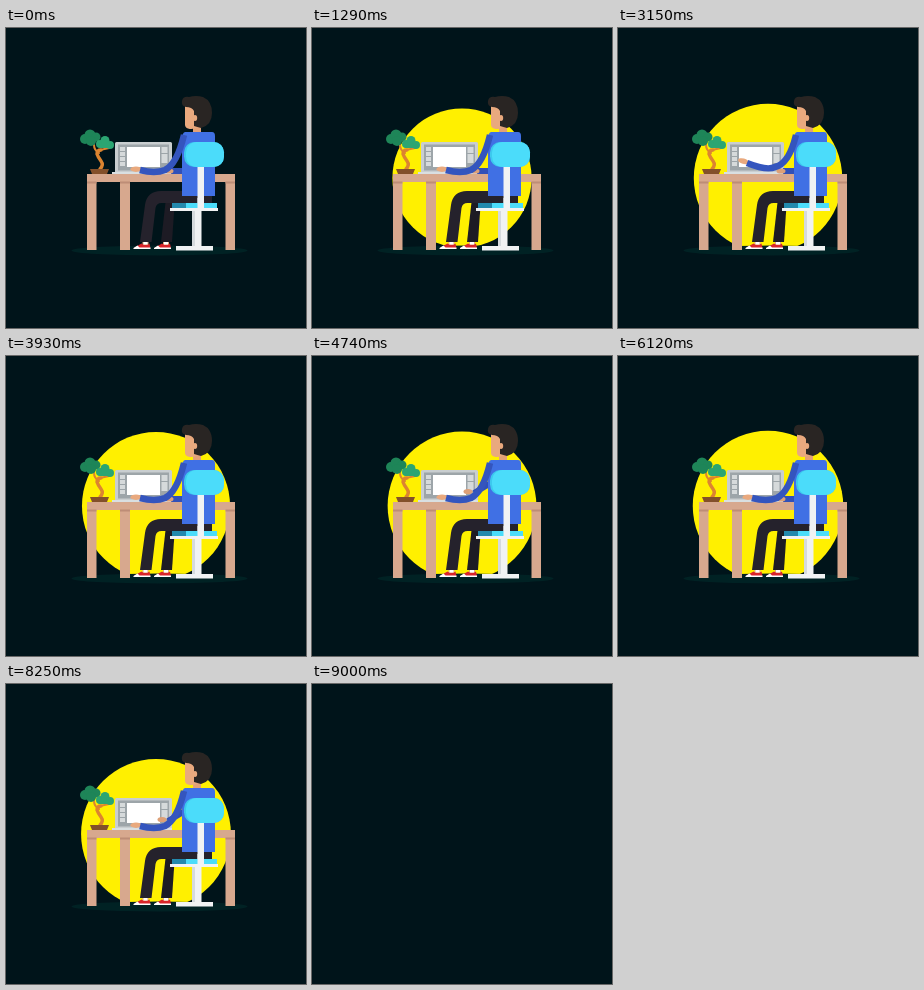
Animation, 300 px wide and 300 px high, one loop 9030 ms. Source, as an HTML page:

```html
<!DOCTYPE html>
<html lang="en">
<head>
<meta charset="utf-8">
<title>Desk work</title>
<style>
  html, body { margin: 0; width: 100%; height: 100%; overflow: hidden; background: #00141a; }
  svg { display: block; width: 100vw; height: 100vh; }
</style>
</head>
<body>
<svg viewBox="0 0 300 300">
  <defs>
    <g id="shoe">
      <path fill="#e3a882" d="M9 0h6v4H9z"/>
      <path fill="#d9252b" d="M1 6 8 2q4 3 8 0l1 5H0z"/>
      <path fill="#fff" d="M0 6.5 4 4l2 2h11v1.5H0zM10 0h4v3h-4z"/>
    </g>
  </defs>
  <g id="scene">
    <circle id="sun" cx="150" cy="150" fill="#fff000"/>
    <ellipse cx="153.5" cy="222.5" rx="88" ry="5" fill="#002224"/>

    <g id="plant">
      <g fill="none" stroke="#dc8430" stroke-linecap="round">
        <path stroke-width="3.4" d="M94 141q4-4 1-8t-4-7q0-4 4-4"/>
        <path stroke-width="2" d="M93 125q-5-3-5-8M94 122l9-2"/>
      </g>
      <g fill="#1e8558">
        <circle cx="79" cy="111" r="5"/><circle cx="84" cy="107" r="5.5"/>
        <circle cx="90" cy="109" r="4.5"/><circle cx="85" cy="113" r="5"/>
      </g>
      <g fill="#2ba572">
        <circle cx="94" cy="116" r="4"/><circle cx="99" cy="112.500" r="4.500"/>
        <circle cx="104" cy="117" r="4"/><path d="M91 116h15v4H93z"/>
      </g>
      <path fill="#83502a" d="M84 141h19l-2 5H86z"/>
    </g>

    <g id="computer">
      <rect x="109" y="114" width="57" height="31" rx="1.500" fill="#c9ced0"/>
      <rect x="112" y="116.500" width="51" height="26" fill="#9da5a9"/>
      <path fill="#fff" d="M121 119h33v20h-33z"/>
      <path fill="#d6dadb" d="M114 119h5v4h-5zm0 5h5v4h-5zm0 5h5v4h-5zm0 5h5v4h-5zM155.500 119h6v6h-6zm0 7h6v9h-6z"/>
      <path fill="#d9dfe1" d="M106 144h60v2h-60z"/>
    </g>

    <g fill="#d7a88e">
      <path d="M81 146h148v8H81zM81 154h9.500v68H81zM114 154h10v68h-10zM219.500 154h9.500v68h-9.500z"/>
      <path fill="#bd8d77" d="M81 153.500h9.500v2H81zM114 153.500h10v2h-10zM219.500 153.500h9.500v2h-9.500z"/>
    </g>

    <path id="farSleeve" fill="none" stroke="#3150b8" stroke-width="6"/>
    <ellipse id="farHand" rx="4.500" ry="2.600" fill="#dda077"/>

    <use href="#shoe" x="127.500" y="213.500"/>
    <use href="#shoe" x="148" y="213.500"/>
    <path fill="#1d1b24" d="M160 170h9l-3 44h-11z"/>
    <path fill="#25222c" d="M206 163h-51q-14 0-16 14l-5 37h11.500l4-34q1-5 6-5H206z"/>

    <path fill="#4070e4" d="M179 104h27q3 0 3 4v60h-33v-57q0-6 3-7z"/>
    <path fill="#e2a177" d="M187 96h8v8h-8z"/>
    <path fill="#e9a97e" d="M179 78h13v21q-5 3-10 1.500-3-1-3-4z"/>
    <path fill="#292523" d="M176 73q1-5 7-4 7-2 14 0 9 4 9 16 0 12-11 15l-7-2v-15q-2-4-8-4-5-1-4-6z"/>
    <ellipse cx="189" cy="90" rx="2.200" ry="3" fill="#e9a97e"/>

    <ellipse id="hand" rx="5.500" ry="2.700" fill="#e9a97e"/>
    <path id="sleeve" fill="none" stroke="#3455be" stroke-width="6.500"/>

    <g id="chair">
      <path fill="#f0f2f3" d="M191.500 136h6.500v46h-6.500z"/>
      <rect x="178" y="114" width="40" height="25" rx="10.500" fill="#3cc9ee"/>
      <rect x="180" y="114" width="38" height="25" rx="10.500" fill="#4bdcfa"/>
      <path fill="#4bdcfa" d="M166 175h45v6h-45z"/>
      <path fill="#2389ad" d="M166 175h14v6h-14z"/>
      <path fill="#f0f2f3" d="M191.500 170h6.500v10h-6.500zM164 180h48v3h-48zM186 183h9.500v36H186zM170 218h37v4.500h-37z"/>
      <path fill="#d5dadd" d="M186 183h3v35h-3z"/>
    </g>
  </g>
</svg>
<script>
  const LOOP = 9030, END = 9000, CYCLE = 2790, GROW = 578;
  const get = id => document.getElementById(id);
  const set = (id, attrs) => {
    for (const key in attrs) get(id).setAttribute(key, attrs[key]);
  };
  const mix = (a, b, k) => a + (b - a) * k;
  const smooth = (a, b, t) => {
    const k = Math.min(1, Math.max(0, (t - a) / (b - a)));
    return k * k * (3 - 2 * k);
  };
  // Rises from a to b, holds, falls from c to d.
  const pulse = (a, b, c, d, t) => smooth(a, b, t) - smooth(c, d, t);

  // Linear growth followed by a damped wobble.
  function radius(t) {
    if (t < GROW) return 75 * t / GROW;
    const s = t - GROW;
    return 75 + 9.2 * Math.sin(2 * Math.PI * s / 880) * Math.exp(-0.00065 * s);
  }

  function draw(t) {
    get("scene").style.display = t < END ? "" : "none";
    set("sun", { r: radius(t) });

    const phase = t % CYCLE;
    const near = pulse(150, 300, 400, 540, phase);
    const far = pulse(1700, 1900, 2680, CYCLE, phase);

    const x = mix(134, 129, near), y = mix(142, 135, near);
    set("sleeve", { d: `M178 107Q171 136 ${mix(159, 157, near)} ${mix(142, 139, near)}Q149 ${mix(146, 143, near)} ${x} ${y}` });
    set("hand", {
      cx: x - 4, cy: y - 0.8,
      transform: `rotate(${mix(0, 15, near)} ${x} ${y})`
    });

    const fx = mix(165, 162, far), fy = mix(143, 137, far);
    set("farSleeve", { d: `M179 ${mix(143, 127, far)}L${fx} ${fy}` });
    set("farHand", { cx: mix(163, 156, far), cy: mix(143, 135.5, far) });
  }

  const start = performance.now();
  function tick() {
    draw((performance.now() - start) % LOOP);
    requestAnimationFrame(tick);
  }
  tick();
</script>
</body>
</html>
```
